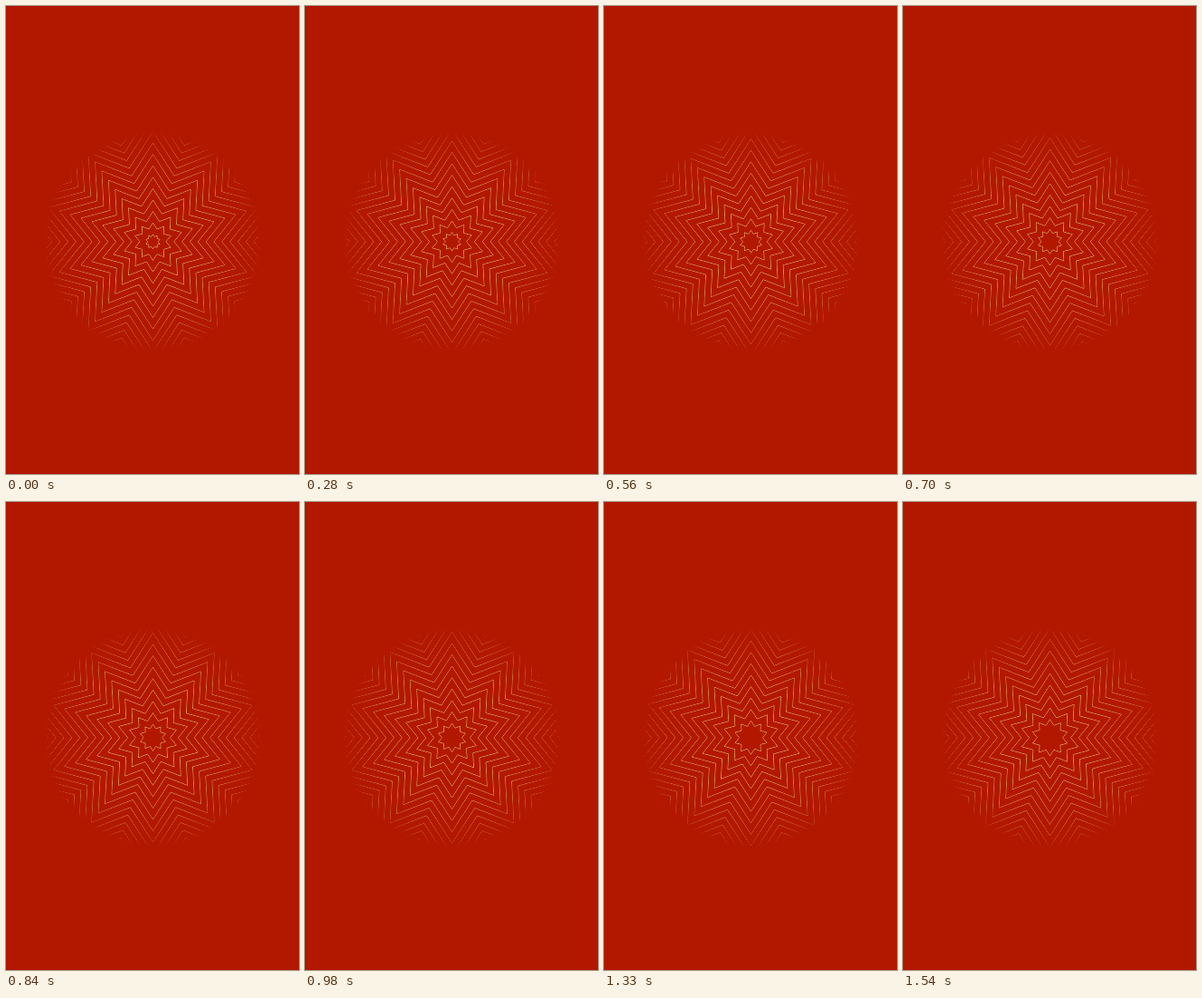
Animation of 324 by 516 pixels, one loop 1.61 s. Source, as an HTML page:

```html
<!DOCTYPE html>
<html lang="en">
<head>
<meta charset="utf-8">
<title>Expanding stars</title>
<style>
html, body { margin: 0; width: 100%; height: 100%; overflow: hidden; background: #b21800; }
svg { display: block; width: 100vw; height: 100vh; }
</style>
</head>
<body>
<svg viewBox="0 0 324 516">
  <defs>
    <radialGradient id="fade" gradientUnits="userSpaceOnUse" cx="162.5" cy="259.8" r="127">
      <stop offset="0" stop-color="#e6b86c"/>
      <stop offset=".4" stop-color="#e6b86c" stop-opacity=".95"/>
      <stop offset=".7" stop-color="#e6b86c" stop-opacity=".78"/>
      <stop offset=".9" stop-color="#e6b86c" stop-opacity=".52"/>
      <stop offset="1" stop-color="#e6b86c" stop-opacity="0"/>
    </radialGradient>
    <!-- Drops the faintest edge pixels so the hairlines stay crisp. -->
    <filter id="crisp" filterUnits="userSpaceOnUse" x="0" y="0" width="324" height="516"
            color-interpolation-filters="sRGB">
      <feComponentTransfer>
        <feFuncA type="linear" slope="1.35" intercept="-.22"/>
      </feComponentTransfer>
    </filter>
  </defs>
  <rect width="324" height="516" fill="#b21800"/>
  <g filter="url(#crisp)">
    <path id="stars" fill="none" stroke="url(#fade)" stroke-width=".75" stroke-linejoin="miter"/>
  </g>
</svg>
<script>
const LOOP = 1610, STEP = 70;
const CX = 162.5, CY = 259.8;
const POINTS = 10, VALLEY = 0.7;
const FIRST = 8.1, GAP = 12.6, RINGS = 14;
const stars = document.getElementById('stars');

function star(radius) {
  const pts = [];
  for (let i = 0; i < POINTS * 2; i++) {
    const a = i * Math.PI / POINTS;
    const r = i % 2 ? radius * VALLEY : radius;
    pts.push((CX + r * Math.sin(a)).toFixed(2) + ' ' + (CY - r * Math.cos(a)).toFixed(2));
  }
  return 'M' + pts.join('L') + 'Z';
}

function draw(now) {
  // The motion advances in even 70 ms steps; each ring grows into the next.
  const phase = Math.floor((now % LOOP) / STEP) * STEP / LOOP;
  let d = '';
  for (let i = 0; i < RINGS; i++) d += star(FIRST + GAP * (i + phase));
  stars.setAttribute('d', d);
}

let start;
function tick(now) {
  if (start === undefined) start = now;
  draw(Math.max(0, now - start));
  requestAnimationFrame(tick);
}
draw(0);
requestAnimationFrame(tick);
</script>
</body>
</html>
```
